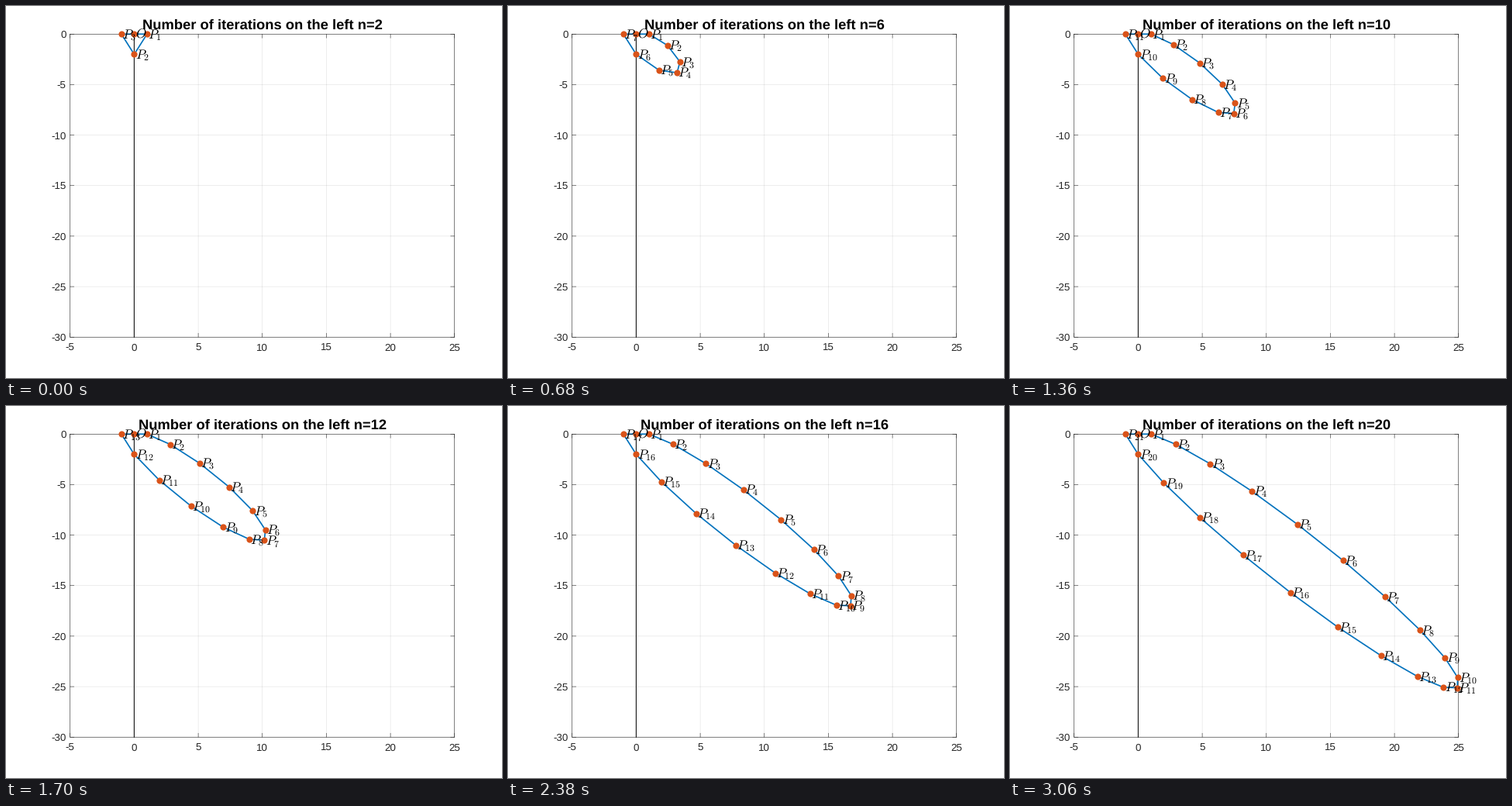
A matplotlib script for the animation above (3230 ms loop, 640 by 480 pixels).

```python
import numpy as np
import matplotlib.pyplot as plt
from matplotlib.animation import FuncAnimation

plt.rcParams.update({
    "font.family": "Liberation Sans",
    "mathtext.fontset": "cm",
    "text.hinting": "none",
    "path.snap": False,
})

DPI = 100
PX = 72 / DPI                       # points per pixel
LEFT, RIGHT, TOP, BOTTOM = 82.75, 578.75, 36.25, 427.25
X_MIN, X_MAX, Y_MIN, Y_MAX = -5, 25, -30, 0
N_FIRST, N_LAST = 2, 20
INK, BLUE, ORANGE = "#262626", "#0072BD", "#D95319"


def to_px(x, y):
    """Plot coordinates to stage pixels."""
    return (LEFT + (x - X_MIN) / (X_MAX - X_MIN) * (RIGHT - LEFT),
            TOP + (Y_MAX - y) / (Y_MAX - Y_MIN) * (BOTTOM - TOP))


def solve_map(n):
    """Find a, s so that (x, y) -> (a x + y + 1, -s x) reaches (0, -2) at step n."""
    def radius(t):
        return 2 * np.sin((n + 1) * t) / np.sin(n * t)

    lo, hi = np.pi / n, 2 * np.pi / (n + 1)
    for _ in range(60):
        t = (lo + hi) / 2
        if radius(t) ** n * -np.sin((n + 1) * t) > np.sin(t):
            lo = t
        else:
            hi = t
    r = radius(t)
    return 2 * r * np.cos(t), r * r


def orbit(n):
    """Origin followed by P_1 ... P_{n+1}."""
    a, s = solve_map(n)
    pts = [(0.0, 0.0)]
    for _ in range(n + 1):
        x, y = pts[-1]
        pts.append((a * x + y + 1, -s * x))
    return np.array(pts)


fig = plt.figure(figsize=(6.4, 4.8), dpi=DPI, facecolor="white")
ax = fig.add_axes([0, 0, 1, 1])
ax.set_xlim(0, 640)
ax.set_ylim(480, 0)
ax.axis("off")


def line(xs, ys, color=INK, width=0.55, **kw):
    return ax.plot(xs, ys, color=color, lw=width * PX, clip_on=False,
                   snap=False, **kw)[0]


def label(x, y, s, size, **kw):
    kw = {"va": "baseline", "color": INK, **kw}
    return ax.text(x, y, s, fontsize=size * PX, **kw)


# Grid, ticks and tick labels
for v in range(X_MIN, X_MAX + 1, 5):
    x = to_px(v, 0)[0]
    line([x, x], [TOP, BOTTOM], alpha=0.15, zorder=1)
    line([x, x], [BOTTOM, BOTTOM - 5], zorder=2)
    line([x, x], [TOP, TOP + 5], zorder=2)
    label(x, 444.5, str(v), 13.33, ha="center")
for v in range(Y_MIN, Y_MAX + 1, 5):
    y = to_px(0, v)[1]
    line([LEFT, RIGHT], [y, y], alpha=0.15, zorder=1)
    line([LEFT, LEFT + 5], [y, y], zorder=2)
    line([RIGHT, RIGHT - 5], [y, y], zorder=2)
    label(77.5, y + 5, str(v), 13.33, ha="right")
line([LEFT, RIGHT, RIGHT, LEFT, LEFT], [TOP, TOP, BOTTOM, BOTTOM, TOP], zorder=2)

x0 = to_px(0, 0)[0]
line([x0, x0], [TOP, BOTTOM], "#1c1c1c", 1.15, zorder=3)

# Moving parts
path = line([], [], BLUE, 1.7, zorder=4, solid_joinstyle="round")
dots = line([], [], ORANGE, 0, zorder=5, ls="none", marker="o",
            ms=8.2 * PX, mew=0)
title = label((LEFT + RIGHT) / 2, 30, "", 18.4, ha="center",
              weight="bold", color="black", zorder=6)
names = [label(0, 0, f"$P_{{{k}}}$" if k else "$O$", 17, color="black", zorder=7)
         for k in range(N_LAST + 2)]
orbits = [orbit(n) for n in range(N_FIRST, N_LAST + 1)]


def update(i):
    x, y = to_px(*orbits[i].T)
    path.set_data(np.append(x, x[0]), np.append(y, y[0]))
    dots.set_data(x, y)
    title.set_text(f"Number of iterations on the left n={N_FIRST + i}")
    for k, name in enumerate(names):
        name.set_visible(k < len(x))
        if k < len(x):
            name.set_position((x[k] + 1.3, y[k] + 5.4))
    return [path, dots, title, *names]


anim = FuncAnimation(fig, update, frames=len(orbits), interval=170,
                     repeat=True, repeat_delay=0, blit=False)
plt.show()
```
